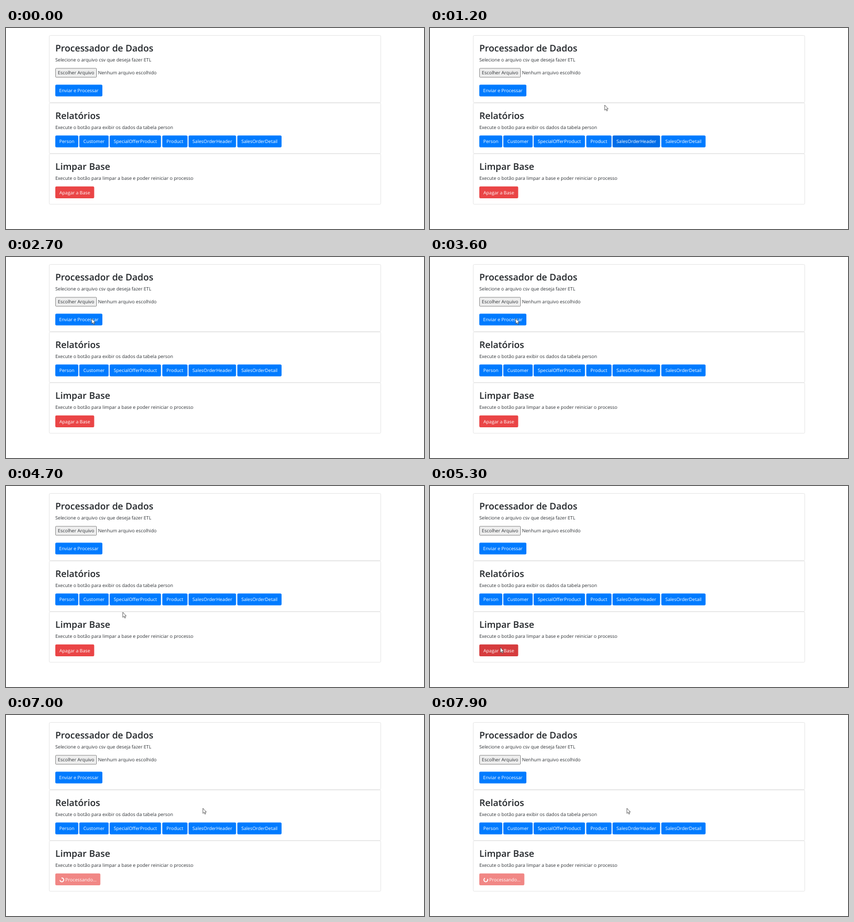
An HTML page that plays this animation: 746 by 360 pixels, repeating every 8000 ms.

```html
<!DOCTYPE html>
<html lang="pt-BR">
<head>
<meta charset="utf-8">
<title>Processador de Dados</title>
<style>
  html, body { margin: 0; height: 100%; overflow: hidden; background: #fff; }
  svg { display: block; }
  text { font: 8.32px "Open Sans", "Noto Sans", sans-serif; fill: #2d3135; text-rendering: geometricPrecision; }
  .title { font-size: 16.4px; font-weight: 600; fill: #212529; }
  .label { font-size: 8.25px; fill: #fff; }
  .card { fill: #fff; stroke: #dcdcdc; stroke-width: .7; }
</style>
</head>
<body>
<svg id="stage" width="746" height="360" viewBox="0 0 746 360"></svg>
<script>
const LOOP = 8000, STEP = 100;
const BUTTON_HEIGHT = 21.2;
const BLUE = '#007bff', BLUE_HOVER = '#006de8';
const CLICK = 5500;
const stage = document.getElementById('stage');

function add(tag, attrs, content = '') {
  const el = document.createElementNS('http://www.w3.org/2000/svg', tag);
  for (const name in attrs) el.setAttribute(name, attrs[name]);
  el.textContent = content;
  return stage.appendChild(el);
}

function card(y, height, title, text) {
  add('rect', { class: 'card', x: 77.2, y, width: 591.6, height, rx: 2 });
  add('text', { class: 'title', x: 88, y: y + 28.7 }, title);
  add('text', { x: 88, y: y + 46.6 }, text);
}

function button(x, y, width, text, fill = BLUE) {
  const rect = add('rect', { x, y, width, height: BUTTON_HEIGHT, rx: 2, fill });
  const label = add('text', { class: 'label', x: x + width / 2, y: y + 13.8, 'text-anchor': 'middle' }, text);
  return { x, y, width, rect, label };
}

card(13.4, 120.2, 'Processador de Dados', 'Selecione o arquivo csv que deseja fazer ETL');
card(134.3, 90.4, 'Relatórios', 'Execute o botão para exibir os dados da tabela person');
card(225.3, 90.4, 'Limpar Base', 'Execute o botão para limpar a base e poder reiniciar o processo');

add('rect', { x: 88.5, y: 72.2, width: 73, height: 16, rx: 1, fill: '#efefef', stroke: '#767676', 'stroke-width': .8 });
add('text', { x: 92.6, y: 83.4 }, 'Escolher Arquivo');
add('text', { x: 164.2, y: 83.4 }, 'Nenhum arquivo escolhido');
button(88, 101.4, 84, 'Enviar e Processar');

const reports = [
  [88, 41, 'Person'],
  [130.8, 52.4, 'Customer'],
  [185, 91.6, 'SpecialOfferProduct'],
  [278.9, 45, 'Product'],
  [325.8, 84.8, 'SalesOrderHeader'],
  [412.8, 79, 'SalesOrderDetail']
].map(([x, width, text]) => button(x, 192.5, width, text));

const clear = button(88, 283.7, 69.4, 'Apagar a Base');
const spinner = add('path', {
  d: 'M2.4 2.4A3.4 3.4 0 1 1 2.4 -2.4', fill: 'none', stroke: '#fff', 'stroke-width': 1.7
});
const cursor = add('path', {
  d: 'M0 0V9.2L2.1 7.4 3.6 10.6 5 10 3.5 6.9H6.3Z', fill: '#fff', stroke: '#3c3c3c', 'stroke-width': .75
});

// Pointer waypoints: time, x, y
const route = [
  [800, 671, 243], [1000, 480, 219], [1100, 380, 197], [1200, 311.8, 138], [1400, 300, 126],
  [1700, 300, 126], [2100, 210, 113], [2500, 153, 110.3],
  [4400, 153, 110.3], [4500, 172, 150], [4600, 202, 216], [4700, 208.4, 226],
  [5000, 160, 268], [5200, 125.6, 289],
  [6200, 125.6, 289], [6500, 300, 235], [6700, 350, 202], [6900, 351.4, 167]
];

function pointerAt(t) {
  const next = route.findIndex(p => p[0] > t);
  if (next < 0) return route[route.length - 1].slice(1);
  if (next === 0) return [-20, -20];
  const [t0, x0, y0] = route[next - 1], [t1, x1, y1] = route[next];
  const k = (t - t0) / (t1 - t0);
  return [x0 + (x1 - x0) * k, y0 + (y1 - y0) * k];
}

function isOver(b, t) {
  const [x, y] = pointerAt(t);
  return x > b.x && x < b.x + b.width && y > b.y && y < b.y + BUTTON_HEIGHT;
}

function draw(now) {
  const t = Math.floor(now % LOOP / STEP) * STEP;
  cursor.setAttribute('transform', `translate(${pointerAt(t)})`);

  // The hover shade lingers for one step
  for (const b of reports) {
    b.rect.setAttribute('fill', isOver(b, t) || isOver(b, t - STEP) ? BLUE_HOVER : BLUE);
  }

  const busy = t >= CLICK, over = isOver(clear, t);
  clear.width = busy ? 80.4 : 69.4;
  clear.rect.setAttribute('width', clear.width);
  clear.rect.setAttribute('fill', busy ? (over ? '#e47474' : '#f18785') : (over ? '#d63c3e' : '#ea4546'));
  clear.label.textContent = busy ? 'Processando...' : 'Apagar a Base';
  clear.label.setAttribute('x', busy ? 133.8 : 122.7);
  spinner.setAttribute('visibility', busy ? 'visible' : 'hidden');
  spinner.setAttribute('transform', `translate(99.6 295.2) rotate(${(t - 5800) / 750 * 360})`);
  requestAnimationFrame(draw);
}
requestAnimationFrame(draw);
</script>
</body>
</html>
```
